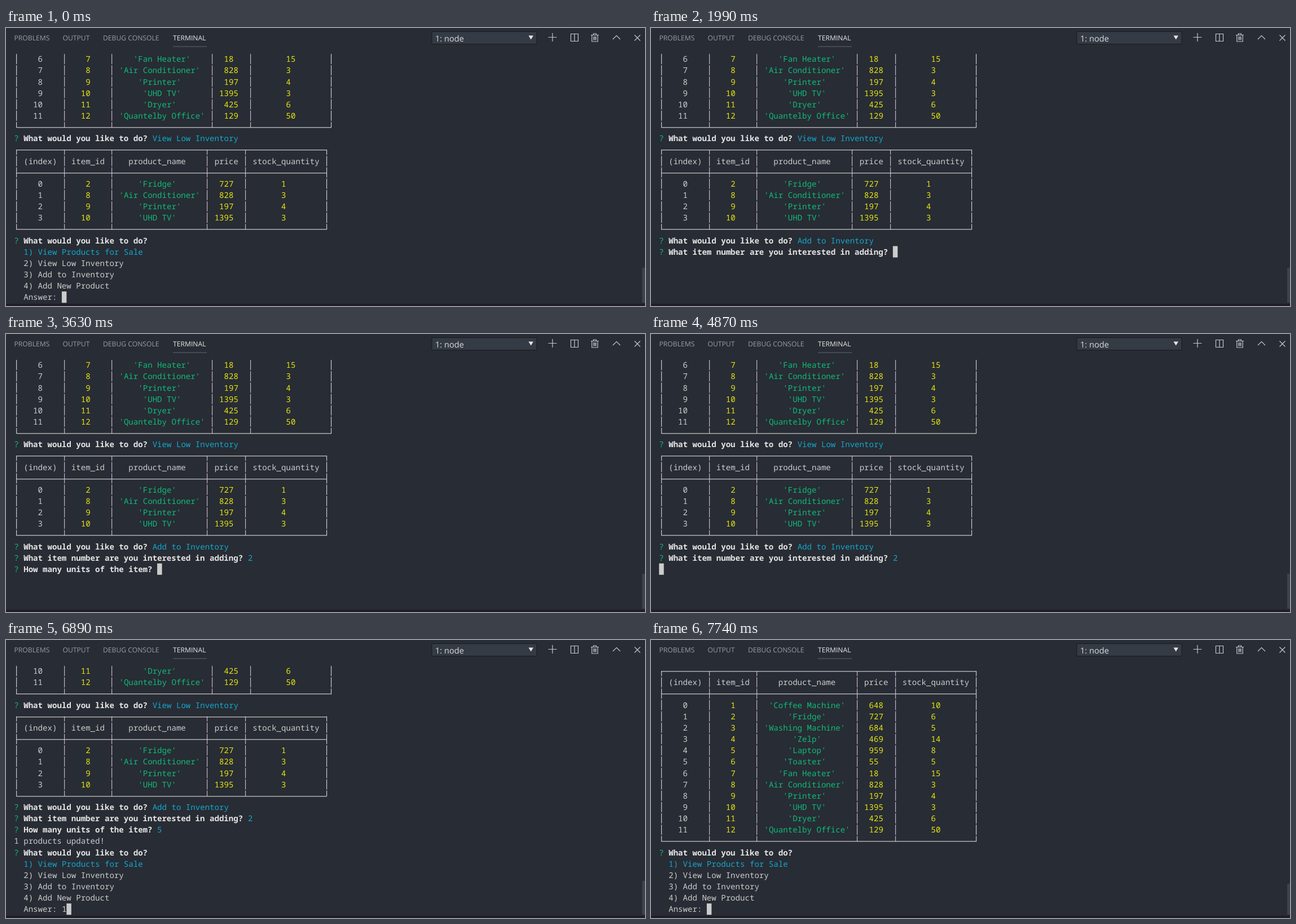
An HTML page for the animation above (8 s loop, 1133 by 494 pixels).

```html
<!DOCTYPE html>
<html lang="en">
<head>
<meta charset="utf-8">
<title>Terminal</title>
<style>
  html, body { margin: 0; width: 100%; height: 100%; overflow: hidden; background: #282c34; }
  svg { display: block; text-rendering: geometricPrecision; }
  .ui { font-family: "Open Sans", "Noto Sans", sans-serif; font-size: 12.15px; fill: #989ca4; }
  .ui .active { fill: #e7e7e7; }
  .icon { fill: none; stroke: #c5c8cd; stroke-width: 1.2; }
  #term { font-family: "Noto Sans Mono", "DejaVu Sans Mono", monospace; font-size: 14.1025px; }
</style>
</head>
<body>
<svg width="1133" height="494" viewBox="0 0 1133 494">
  <rect width="1133" height="494" fill="#282c34"/>
  <g class="ui">
    <text x="14.5" y="22">PROBLEMS</text>
    <text x="100.5" y="22">OUTPUT</text>
    <text x="172" y="22">DEBUG CONSOLE</text>
    <text x="296" y="22" class="active">TERMINAL</text>
    <rect x="296" y="32.5" width="60" height="1" fill="#62666e"/>
    <rect x="755" y="6.5" width="186" height="22" fill="#353b45" stroke="#181a1f"/>
    <text x="761" y="24" font-size="14.6" fill="#d7dae0">1: node</text>
    <path d="M926.5 13.5h8.5l-4.25 7z" fill="#e4e6ea"/>
  </g>
  <g class="icon">
    <path d="M961.5 16.5h15M969 9v15"/>
    <path d="M1001.5 10.5h13v13h-13zM1008 10.5v13"/>
    <path d="M1037 12.5h14M1041.5 12.5v-2.5h5v2.5M1038.8 12.5v11.5h10.4v-11.5M1042 15v6.5M1044 15v6.5M1046 15v6.5"/>
    <path d="M1076 20l6.5-6.5 6.5 6.5"/>
    <path d="M1114.5 12.5l10 10M1124.5 12.5l-10 10"/>
  </g>
  <g id="term"></g>
  <rect id="thumb" x="1128" width="5" fill="#3d424c"/>
  <rect y="490" width="1133" height="4" fill="#211d28"/>
</svg>
<script>
const LOOP = 8000, LEFT = 14.27, TOP = 45, CW = 8.4615, LH = 20.15;
const FG = '#cccccc', WHITE = '#e5e5e5', GREEN = '#0dbc79', YELLOW = '#e5e510', CYAN = '#11a8cd';
const TINT = '#c3b3cd';

const term = document.getElementById('term');
const thumb = document.getElementById('thumb');
const colX = c => LEFT + c * CW;
const rowY = r => TOP + r * LH;

// A line is a function of its row that returns SVG markup.
const run = (col, str, fill = FG, bold = false) => r =>
  `<text x="${colX(col)}" y="${rowY(r) + 15.2}" fill="${fill}"${bold ? ' font-weight="700"' : ''}>${str}</text>`;
const line = (...parts) => r => parts.map(p => p(r)).join('');
const box = (x, y, w, h, fill = FG) => `<rect x="${x}" y="${y}" width="${w}" height="${h}" fill="${fill}"/>`;
const cursor = col => r => box(colX(col), rowY(r), CW, LH);

const HEAD = ['(index)', 'item_id', 'product_name', 'price', 'stock_quantity'];

function table(items) {
  const rows = items.map(([id, name, price, stock], i) => [i, id, `'${name}'`, price, stock].map(String));
  const widths = HEAD.map((h, c) => 2 + Math.max(h.length, ...rows.map(row => row[c].length)));
  const edges = [0];
  widths.forEach((w, c) => edges.push(edges[c] + w + 1));

  const bars = (from, to) => r => edges.map((e, i) =>
    box(Math.round(colX(e + 0.5) - 0.5), rowY(r) + from, 1.2, to - from,
      i > 0 && i < edges.length - 1 ? TINT : FG)).join('');
  const mid = LH / 2;
  const rule = (from, to) => line(bars(from, to), r =>
    box(colX(0.5), Math.round(rowY(r) + mid) + 0.2, CW * edges[edges.length - 1], 1.2));
  const cells = (row, fills) => line(bars(1, 19.2), ...row.map((s, c) =>
    run(edges[c] + 1 + Math.floor((widths[c] - s.length) / 2), s, fills[c])));

  return [
    rule(mid, 19.2),
    cells(HEAD, []),
    rule(1, 19.2),
    ...rows.map(row => cells(row, [FG, YELLOW, GREEN, YELLOW, YELLOW])),
    rule(1, mid + 1)
  ];
}

const ask = (question, answer = '', fill = CYAN) => line(
  run(0, '?', GREEN), run(2, question, WHITE, true), run(question.length + 3, answer, fill));
const typing = (question, answer = '') =>
  line(ask(question, answer, FG), cursor(question.length + 3 + answer.length));

const ACTIONS = ['View Products for Sale', 'View Low Inventory', 'Add to Inventory', 'Add New Product'];
const TODO = 'What would you like to do?';
const WHICH = 'What item number are you interested in adding?';
const UNITS = 'How many units of the item?';

const menu = (picked, typed = '') => [
  ask(TODO),
  ...ACTIONS.map((a, i) => run(2, `${i + 1}) ${a}`, i + 1 === picked ? CYAN : FG)),
  line(run(2, 'Answer:'), run(10, typed), cursor(10 + typed.length))
];

const stock = [
  [1, 'Coffee Machine', 648, 10], [2, 'Fridge', 727, 6], [3, 'Washing Machine', 684, 5],
  [4, 'Zelp', 469, 14], [5, 'Laptop', 959, 8], [6, 'Toaster', 55, 5],
  [7, 'Fan Heater', 18, 15], [8, 'Air Conditioner', 828, 3], [9, 'Printer', 197, 4],
  [10, 'UHD TV', 1395, 3], [11, 'Dryer', 425, 6], [12, 'Quantelby Office', 129, 50]
];
const low = [[2, 'Fridge', 727, 1], ...stock.filter(([id, , , left]) => id > 7 && left < 5)];

const all = table(stock);
const before = [...all.slice(9), ask(TODO, ACTIONS[1]), ...table(low)];
const chosen = [...before, ask(TODO, ACTIONS[2])];
const numbered = [...chosen, ask(WHICH, '2')];
const counted = [...numbered, ask(UNITS, '5')];
const updated = [...counted, run(0, '1 products updated!')].slice(4);
const idle = cursor(0);

// [start in ms, lines, top of the scrollbar thumb]
const scenes = [
  [0, [...before, ...menu(1)], 426],
  [680, [...before, idle], 426],
  [750, [...before, ...menu(3, '3')], 426],
  [1990, [...chosen, typing(WHICH)], 426],
  [2940, [...chosen, idle], 426],
  [3010, [...chosen, typing(WHICH, '2')], 426],
  [3550, [...numbered, idle], 426],
  [3630, [...numbered, typing(UNITS)], 426],
  [4870, [...numbered, idle], 426],
  [4950, [...numbered, typing(UNITS, '5')], 426],
  [5480, [...counted, idle], 426],
  [5570, [...updated, ...menu(1)], 428],
  [6890, [...updated, ...menu(1, '1')], 428],
  [7670, [...updated, idle], 428],
  [7740, [...all, ...menu(1)], 433]
];

let shown = null;
function draw(t) {
  const scene = scenes.filter(s => s[0] <= t).pop();
  if (scene === shown) return;
  shown = scene;
  const [, lines, top] = scene;
  term.innerHTML = lines.map((l, r) => l(r)).join('');
  thumb.setAttribute('y', top);
  thumb.setAttribute('height', 488 - top);
}

draw(0);
let start = null;
function tick(now) {
  if (start === null) start = now;
  draw(Math.max(0, now - start) % LOOP);
  requestAnimationFrame(tick);
}
requestAnimationFrame(tick);
</script>
</body>
</html>
```
